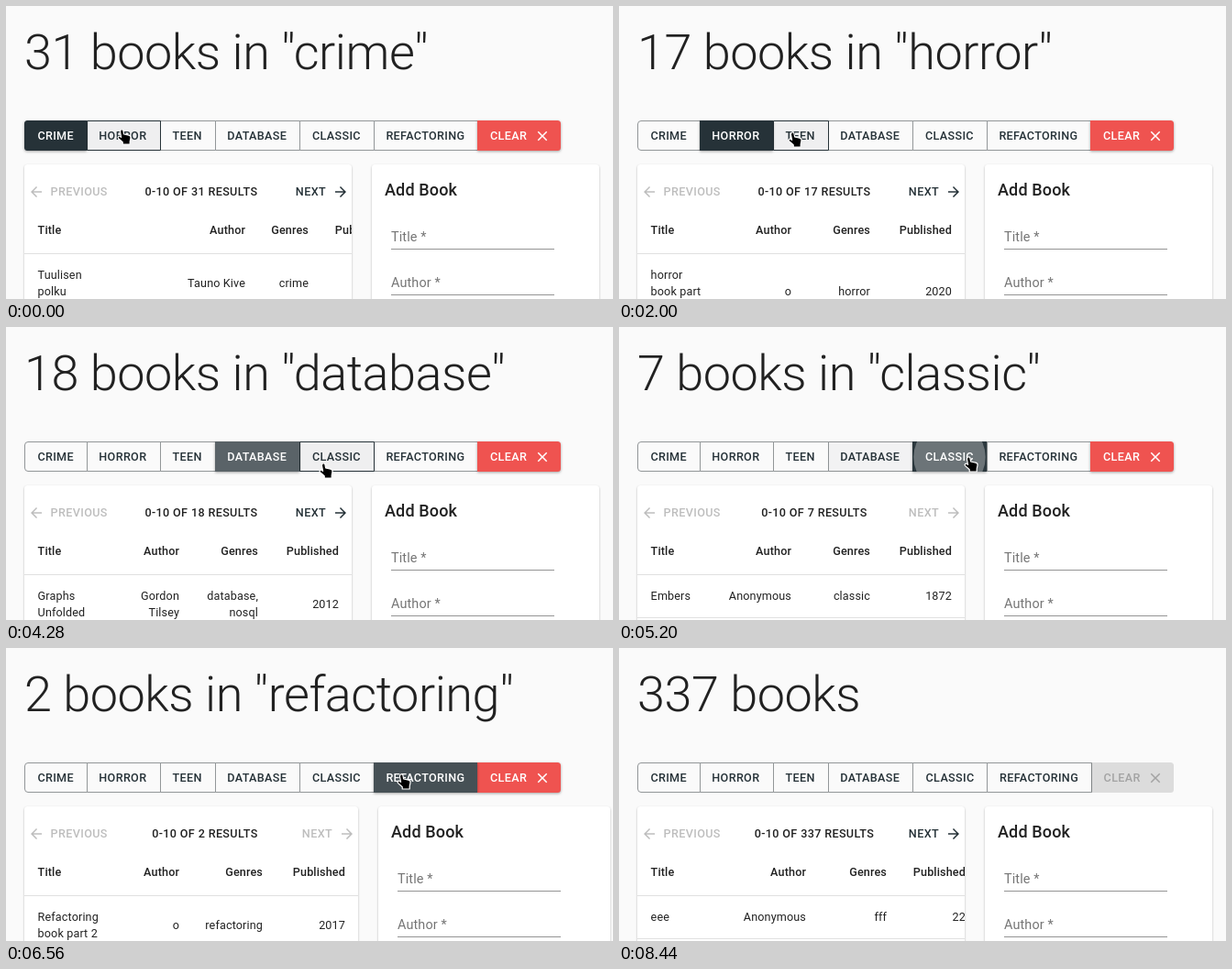
Animation, 662 px wide and 320 px high, one loop 8.72 s. Source, as an HTML page:

```html
<!DOCTYPE html>
<html lang="en">
<head>
<meta charset="utf-8">
<title>Books by genre</title>
<style>
html, body { margin: 0; width: 100%; height: 100%; overflow: hidden; background: #fafafa; }
svg { display: block; font: 12.6px Roboto, sans-serif; letter-spacing: .01071em; fill: rgba(0,0,0,.87); }
text { white-space: pre; }
.h2 { font-size: 54px; font-weight: 300; letter-spacing: -.00833em; }
.h6 { font-size: 18px; font-weight: 500; letter-spacing: .0075em; }
.th { font-weight: 500; }
.btn { font-weight: 500; letter-spacing: .02857em; }
.field { font-size: 14.4px; letter-spacing: .00938em; fill: rgba(0,0,0,.54); }
.paper { fill: #fff; filter: drop-shadow(0 1px 1.2px rgba(0,0,0,.27)); }
.raised { filter: drop-shadow(0 1.5px 1.5px rgba(0,0,0,.35)); }
</style>
</head>
<body>
<svg id="stage" width="662" height="320" viewBox="0 0 662 320"></svg>
<script>
const LOOP = 8720, STEP = 40, FADE = 250;
const DARK = '#263238', OFF = 'rgba(0,0,0,.26)';
const labels = ['CRIME', 'HORROR', 'TEEN', 'DATABASE', 'CLASSIC', 'REFACTORING', 'CLEAR'];
const edges = [20, 88, 168, 228, 320, 401, 514, 605];
const labelX = [34.4, 101.3, 181.6, 241.3, 333.9, 414.4, 528];

// at: start time, sel: chosen genre, cols: right edges of Author, Genres, Published
const views = [
  { at: 0, sel: 0, count: 31, cols: [261, 330, 416], row: ['Tuulisen|polku', 'Tauno Kive', 'crime', ''] },
  { at: 1280, sel: 1, count: 17, cols: [188, 274, 363], row: ['horror|book part|1', 'o', 'horror', '2020'] },
  { at: 2720, sel: 2, count: 5, cols: [188, 274, 363], row: ['Willy|Barrow: 1', 'Anonymous', 'teen,|horror', '1999'] },
  { at: 4000, sel: 3, count: 18, cols: [189, 275, 363], row: ['Graphs|Unfolded', 'Gordon|Tilsey', 'database,|nosql', '2012'] },
  { at: 5000, sel: 4, count: 7, cols: [188, 274, 363], row: ['Embers', 'Anonymous', 'classic', '1872'] },
  { at: 6170, sel: 5, count: 2, cols: [189, 280, 370], row: ['Refactoring|book part 2', 'o', 'refactoring', '2017'], wide: 7 },
  { at: 7400, sel: -1, count: 337, cols: [204, 292, 378], row: ['eee', 'Anonymous', 'fff', '22'] }
];

// pointer hot spot: time, x, y
const track = [
  [0, 127, 135], [40, 127, 135], [320, 144, 136], [1280, 144, 136], [1640, 188, 138], [1960, 188, 138],
  [2000, 190, 138], [2200, 195, 139], [2440, 195, 139], [2480, 196, 140], [2680, 196, 140],
  [2900, 283, 138], [3960, 283, 138], [4240, 347, 149], [4680, 347, 149], [4720, 354, 146],
  [4800, 360, 144], [5080, 360, 144], [5480, 432, 138], [6800, 432, 138], [6840, 538, 146],
  [7600, 538, 146], [8200, 74, 6], [8240, 74, 6], [8400, 77, -8], [8440, 77, -40], [LOOP, 77, -40]
];

const clamp = v => Math.max(0, Math.min(1, v));
const ease = v => { v = clamp(v); return v < .3 ? 2.6 * v * v : 1 - .766 * ((1 - v) / .7) ** 2.6; };

function pointer(t) {
  const i = track.findIndex(k => k[0] > t);
  const [a, b] = [track[i - 1], track[i]];
  const p = (t - a[0]) / (b[0] - a[0]);
  return [1, 2].map(j => Math.round(a[j] + (b[j] - a[j]) * p));
}

const text = (x, y, s, cls = '', attrs = '') => `<text x="${x}" y="${y}" class="${cls}" ${attrs}>${s}</text>`;
const right = (x, y, s, cls) => text(x, y, s, cls, 'text-anchor="end"');
const rect = (x, y, w, h, attrs) => `<rect x="${x}" y="${y}" width="${w}" height="${h}" ${attrs}/>`;
const icon = (x, y, d, fill, flip = 1) =>
  `<path d="${d}" fill="${fill}" transform="translate(${x} ${y}) scale(${.75 * flip} .75) translate(-12 -12)"/>`;
const ARROW = 'M12 4l-1.41 1.41L16.17 11H4v2h12.17l-5.58 5.59L12 20l8-8z';
const CROSS = 'M19 6.41L17.59 5 12 10.59 6.41 5 5 6.41 10.59 12 5 17.59 6.41 19 12 13.41 17.59 19 19 17.59 13.41 12z';

// button body with rounded outer corners
function shape(l, r, i, inset = 0) {
  const a = i == 0 ? 3.5 : 0, b = i == 6 ? 3.5 : 0, y = 125 + inset, h = 33 - 2 * inset;
  l += inset; r += inset;
  return `M${l + a} ${y}H${r - b}q${b} 0 ${b} ${b}v${h - 2 * b}q0 ${b} ${-b} ${b}H${l + a}q${-a} 0 ${-a} ${-a}v${2 * a - h}q0 ${-a} ${a} ${-a}z`;
}

function buttons(t, view, old, px, hover) {
  const age = t - view.at, p = old < 0 ? 1 : ease(age / FADE);
  const none = view.sel < 0;
  const narrow = old >= 0 && !none && age < 100;
  const shift = i => narrow ? (i > old) + (i > view.sel) : 0;
  const x = edges.map((e, i) => e - shift(i) + (none && i == 6 ? 1 : 0));
  const body = (i, attrs) => `<path d="${shape(x[i], x[i + 1], i)}" ${attrs}/>`;
  const outline = (i, stroke, fill) => `<path d="${shape(x[i], x[i + 1], i, .5)}" stroke="${stroke}" fill="${fill}"/>`;
  let out = '';

  for (let i = 0; i < 6; i++)
    if (!narrow || i != view.sel) out += outline(i, '#929698', 'none');
  if (hover >= 0 && hover < 6 && hover != view.sel) out += outline(hover, DARK, 'rgba(38,50,56,.05)');
  if (narrow) out += body(view.sel, 'fill="#f0f1f2"');

  if (none) {
    out += body(6, `fill="#c62828" opacity="${1 - p}"`) + body(6, `fill="#000" opacity="${.12 * p}"`);
  } else {
    out += body(6, `fill="${hover == 6 ? '#c62828' : '#ef5350'}" class="raised"`);
  }
  if (old >= 0 && p < 1) out += body(old, `fill="${DARK}" opacity="${1 - p}" class="raised"`);
  if (old >= 0 && none && p < 1) out += outline(old, DARK, 'none');
  if (!none) {
    out += body(view.sel, `fill="${DARK}" opacity="${p}" class="raised"`);
    const wave = .3 * clamp((560 - age) / 350);
    if (old >= 0 && wave > 0) {
      const cx = (x[view.sel] + x[view.sel + 1]) / 2;
      out += `<clipPath id="key"><path d="${shape(x[view.sel], x[view.sel + 1], view.sel)}"/></clipPath>
        <circle cx="${cx}" cy="142" r="${10 + 60 * ease(age / 500)}" fill="#fff" opacity="${wave}" clip-path="url(#key)"/>`;
    }
  }

  labels.forEach((s, i) => {
    const fill = i == 6 ? (none ? OFF : '#fff') : i == view.sel ? '#fff' : DARK;
    out += text(labelX[i] - shift(i) + (none && i > 3 ? .6 : 0), 146.4, s, 'btn', `fill="${fill}"`);
  });
  return out + icon(585 - shift(6), 142, CROSS, none ? OFF : '#fff');
}

function table(view) {
  const wide = view.wide || 0, edge = 377 + wide;
  const last = view.count <= 10 ? OFF : DARK;
  const lines = view.row.map(s => s.split('|'));
  const most = Math.max(...lines.map(l => l.length));
  let out = rect(20, 173, edge - 20, 170, 'rx="3.6" class="paper"')
    + icon(33, 203, ARROW, OFF, -1) + text(48.6, 207.4, 'PREVIOUS', 'btn', `fill="${OFF}"`)
    + text(213 + (wide ? 4 : 0), 207.4, `0-10 OF ${view.count} RESULTS`, 'btn', 'text-anchor="middle"')
    + right(349 + wide, 207.4, 'NEXT', 'btn" fill="' + last) + icon(365 + wide, 203, ARROW, last)
    + `<clipPath id="sheet"><rect x="20" y="173" width="${edge - 20}" height="147"/></clipPath><g clip-path="url(#sheet)">`
    + rect(20, 270, edge - 20, 1, 'fill="#e0e0e0"')
    + text(34.6, 249.2, 'Title', 'th');
  ['Author', 'Genres', 'Published'].forEach((s, i) => out += right(view.cols[i], 249.2, s, 'th'));
  lines.forEach((cell, c) => cell.forEach((s, i) => {
    const y = 298.2 + 18 * i + 9 * (most - cell.length);
    out += c ? right(view.cols[c - 1], y, s) : text(34.6, y, s);
  }));
  if (most == 1) out += rect(20, 317, edge - 20, 1, 'fill="#e0e0e0"');
  return out + '</g>';
}

function form(wide) {
  let out = rect(399 + wide, 173, wide ? 253 : 248, 170, 'rx="3.6" class="paper"')
    + text(413 + wide, 207, 'Add Book', 'h6');
  ['Title *', 'Author *'].forEach((s, i) => {
    out += text(420 + wide, 257 + 50 * i, s, 'field') + rect(420 + wide, 265 + 50 * i, 178, 1, 'fill="#949494"');
  });
  return out;
}

function cursor(x, y, hand) {
  const d = hand
    ? 'M-2 .3C-1-.6.6-.2.9 1L1.6 5 7 6.2C8.8 6.6 9.3 7.6 9 9.2L8.2 13V16H.2V13.8L-4.4 9.6C-5.8 8-4 6.6-2.4 7.6L-1.4 8.4-2.6 2Z'
    : 'M0 0V15.5L3.6 12.2 6 18 8.6 17 6.2 11.4H11Z';
  return `<path d="${d}" transform="translate(${x} ${y})" fill="#000" stroke="#fff" stroke-width="1.2" stroke-linejoin="round"/>`;
}

function scene(t) {
  const n = views.findLastIndex(v => v.at <= t), view = views[n];
  const old = n ? views[n - 1].sel : -1;
  const [px, py] = pointer(t);
  let hover = py >= 125 && py <= 158 ? edges.findLastIndex(e => e <= px) : -1;
  if (hover > 6 || (hover == 6 && view.sel < 0)) hover = -1;
  const genre = view.sel < 0 ? '' : ` in "${labels[view.sel].toLowerCase()}"`;
  return text(20, 68.6, `${view.count} books${genre}`, 'h2')
    + buttons(t, view, old, px, hover) + table(view) + form(view.wide || 0)
    + (py > -25 ? cursor(px, py, hover >= 0) : '');
}

const stage = document.getElementById('stage');
let shown = -1;
function tick() {
  const now = performance.now() % LOOP, t = now - now % STEP;
  if (t != shown) stage.innerHTML = scene(shown = t);
  requestAnimationFrame(tick);
}
tick();
</script>
</body>
</html>
```
